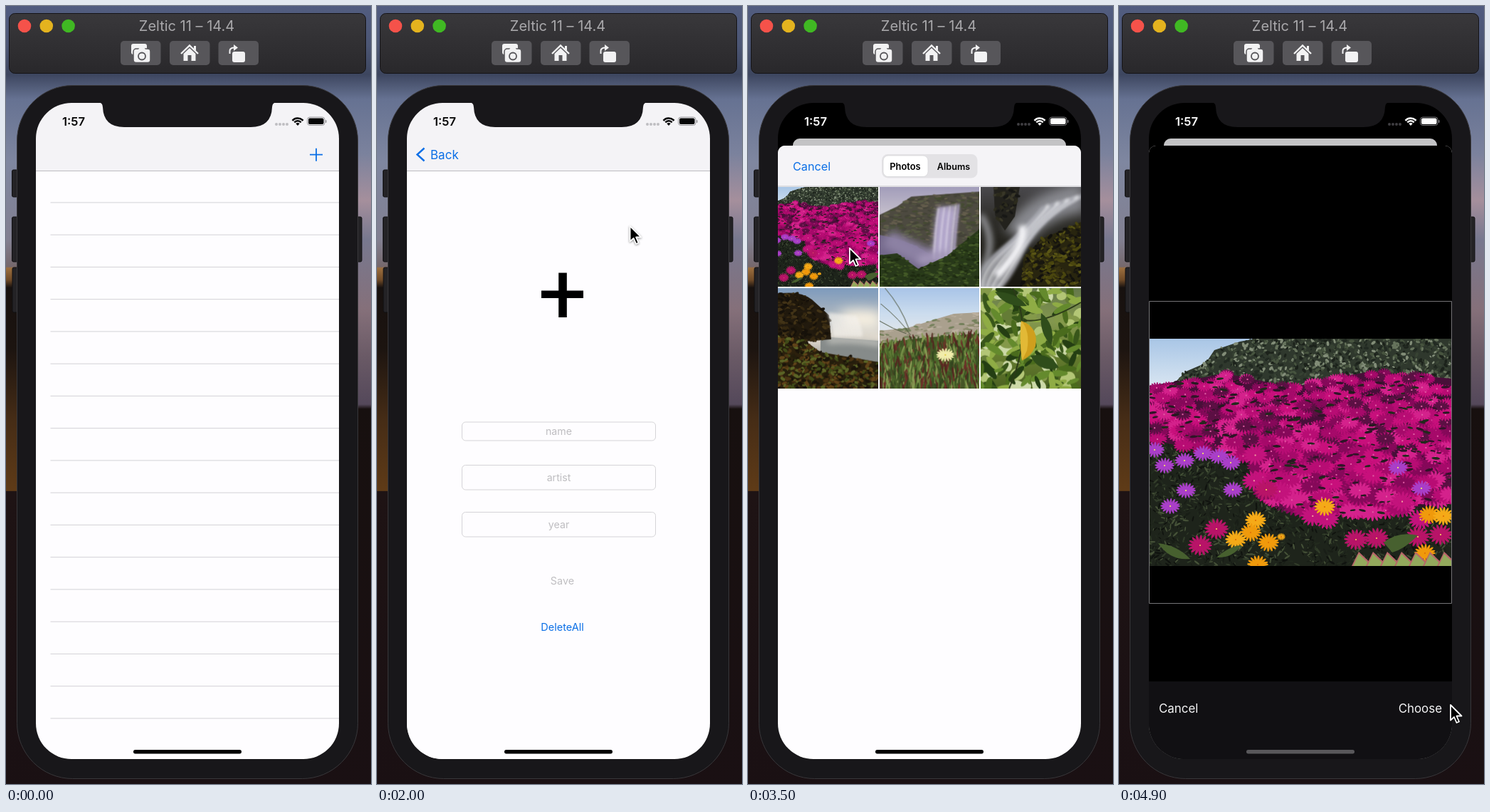
Animation, 513 px wide and 1092 px high, one loop 5000 ms. Source, as an HTML page with a canvas:

```html
<!DOCTYPE html>
<html lang="en">
<head>
<meta charset="utf-8">
<title>Phone simulator</title>
<style>
html, body { margin: 0; width: 100%; height: 100%; overflow: hidden; background: #17100f; }
canvas { display: block; width: 513px; height: 1092px; }
</style>
</head>
<body>
<canvas id="stage" width="513" height="1092"></canvas>
<script>
const LOOP = 5000;
const BLUE = '#0b6fe6';
const SCREEN = { x: 42, y: 136, w: 426, h: 921 };
const ctx = document.getElementById('stage').getContext('2d');

// Drawing helpers
function box(x, y, w, h, r, fill, stroke, lineWidth = 1) {
  ctx.beginPath();
  ctx.roundRect(x, y, w, h, r);
  if (fill) { ctx.fillStyle = fill; ctx.fill(); }
  if (stroke) { ctx.strokeStyle = stroke; ctx.lineWidth = lineWidth; ctx.stroke(); }
}
function disc(x, y, r, fill) {
  ctx.beginPath();
  ctx.arc(x, y, r, 0, 7);
  ctx.fillStyle = fill;
  ctx.fill();
}
function path(d, fill, stroke, lineWidth = 2) {
  const p = new Path2D(d);
  if (fill) { ctx.fillStyle = fill; ctx.fill(p); }
  if (stroke) { ctx.strokeStyle = stroke; ctx.lineWidth = lineWidth; ctx.stroke(p); }
}
// y is the middle of the capitals
function text(s, x, y, size, color, align = 'left', weight = 400) {
  ctx.font = `${weight} ${size}px Inter, sans-serif`;
  ctx.textAlign = align;
  ctx.fillStyle = color;
  ctx.fillText(s, x, y + size * 0.36);
}
function group(draw) {
  ctx.save();
  draw();
  ctx.restore();
}
function clip(x, y, w, h, r) {
  ctx.beginPath();
  ctx.roundRect(x, y, w, h, r);
  ctx.clip();
}
function gradient(g, y0, y1, stops) {
  const fill = g.createLinearGradient(0, y0, 0, y1);
  stops.forEach(([at, color]) => fill.addColorStop(at, color));
  return fill;
}

// Photos, painted once
let seed = 7;
function random() {
  seed = (seed * 16807) % 2147483647;
  return seed / 2147483647;
}
function pick(colors) {
  return colors[Math.floor(random() * colors.length)];
}
function photo(w, h, sky, paint) {
  const canvas = document.createElement('canvas');
  canvas.width = w;
  canvas.height = h;
  const g = canvas.getContext('2d');
  g.fillStyle = gradient(g, 0, h, sky.map((c, i) => [i / (sky.length - 1), c]));
  g.fillRect(0, 0, w, h);
  const shape = (color, d) => { g.fillStyle = color; g.fill(new Path2D(d)); };
  const scatter = (d, n, place) => {
    const area = new Path2D(d);
    for (let i = 0; i < n; i++) {
      const x = random() * w, y = random() * h;
      if (g.isPointInPath(area, x, y)) place(x, y);
    }
  };
  const specks = (d, n, rx, ry, colors, tilt = 0.3) => scatter(d, n, (x, y) => {
    const k = 0.5 + random() * 0.7;
    g.fillStyle = pick(colors);
    g.beginPath();
    g.ellipse(x, y, rx * k, ry * k, (random() - 0.5) * 2 * tilt, 0, 7);
    g.fill();
  });
  const veil = (color, width, d, blur = 3) => {
    g.save();
    g.filter = `blur(${blur}px)`;
    g.strokeStyle = color;
    g.lineWidth = width;
    g.stroke(new Path2D(d));
    g.restore();
  };
  const bloom = (x, y, r, color, heart, squash = 0.75) => {
    g.fillStyle = color;
    for (let a = 0; a < 6.2; a += 0.4) {
      g.beginPath();
      g.ellipse(x + Math.cos(a) * r * 0.5, y + Math.sin(a) * r * 0.5 * squash, r * 0.5, r * 0.12, a, 0, 7);
      g.fill();
    }
    g.fillStyle = heart;
    g.fillRect(x - 1, y - 1, 2, 2);
  };
  paint({ g, shape, scatter, specks, veil, bloom });
  return canvas;
}

const flowers = photo(426, 319, ['#a9c6e6', '#d6e4f1', '#20251d', '#1d211a', '#191b17', '#151713'],
  ({ shape, scatter, specks, bloom }) => {
    const hedge = 'M30 68 52 46 80 34 92 16 128 4 150 0H426V75H30Z';
    const bed = 'M0 66 80 54 105 48 200 68 310 46 426 56V225L340 245 235 245 165 225 150 170 0 142Z';
    const fringe = 'M0 130 160 130 180 230 250 270 426 270V200H0Z';
    const ground = 'M0 140 130 150 180 230 426 215V319H0Z';
    shape('#2f382d', hedge);
    specks(hedge, 6500, 3.2, 1.8, ['#47543f', '#66735c', '#222a22', '#374233', '#828d78', '#1c221b'], 1.5);
    shape('#1e241b', ground);
    specks(ground, 5000, 4, 1.1, ['#323d2a', '#10130f', '#465238', '#222a1e', '#191e17'], 1.5);
    shape('#480f39', bed);
    scatter(bed, 1500, (x, y) =>
      bloom(x, y, 8 + y / 24, pick(['#c8107c', '#a60a6a', '#b80d74', '#86095a', '#d4228c', '#5c1044']), '#e060a4', 0.45));
    specks(bed, 550, 5, 1.6, ['#251a20', '#301428', '#212a1c']);
    scatter(fringe, 45, (x, y) => { if (x > 140) bloom(x, y, 17, '#c3137c', '#efa0a0', 0.7); });
    [[8, 156], [22, 178], [50, 171], [76, 161], [98, 165], [115, 174], [52, 213], [30, 235], [118, 212], [350, 181], [383, 210]]
      .forEach(([x, y]) => bloom(x, y, 14, '#a93fc8', '#ead070', 0.6));
    [[72, 290], [95, 267], [291, 282], [378, 278], [410, 275], [320, 280], [165, 212]]
      .forEach(([x, y]) => bloom(x, y, 17, '#b81468', '#f0b060'));
    [[150, 255], [143, 272], [122, 282], [168, 286], [247, 236], [394, 247], [414, 249], [388, 301], [186, 278], [153, 317]]
      .forEach(([x, y], i) => bloom(x, y, i === 8 ? 6 : 15, i % 2 ? '#f09a0c' : '#f5aa18', '#e07808'));
    shape('#47602f', 'M13 287Q40 290 58 309Q30 312 13 287ZM95 307Q115 290 130 290Q118 308 95 307ZM330 286Q350 270 378 276Q360 295 342 300Z');
    for (let x = 285; x < 426; x += 20) {
      shape('#b9656a', `M${x} 319 ${x + 10} 299 ${x + 31} 319Z`);
      shape('#93a95c', `M${x + 2} 319 ${x + 10} 302 ${x + 28} 319Z`);
    }
  });

const valley = photo(141, 141, ['#a29dba', '#c2bccb', '#665d7b', '#827596', '#31421f'], ({ shape, specks, veil }) => {
  const hill = 'M0 40 25 28 45 14 100 10 141 7V100L90 108 50 82 0 70Z';
  const bank = 'M0 97 25 94 55 116 95 98 141 60V141H0Z';
  shape('#4d4a40', hill);
  specks(hill, 900, 4, 1.4, ['#575a42', '#444338', '#645d4c', '#454b32']);
  shape('#73688a', 'M0 68Q40 75 70 95L100 100 60 125 20 105 0 100Z');
  veil('#8d82a4', 26, 'M10 72Q40 90 80 104', 6);
  veil('#a79bc0', 26, 'M96 30Q90 60 88 100', 4);
  for (let x = 80; x < 110; x += 4) veil(x % 8 ? '#b5a9cf' : '#d8d0e6', 3, `M${x + 4} ${30 - (x - 80) / 5}Q${x - 1} 60 ${x - 3} 102`, 1.5);
  veil('#a397b8', 12, 'M55 104Q80 98 100 96', 5);
  shape('#28381a', bank);
  specks(bank, 1100, 3, 1.5, ['#36491f', '#1f2c12', '#435927', '#2a3d19']);
});

const stream = photo(141, 141, ['#4a494d', '#2f2e2a', '#1f1e18', '#191810'], ({ shape, specks, veil }) => {
  const moss = 'M60 100 85 74 141 50V141H58Z';
  const rock = 'M18 0H55L48 42 34 62 20 40Z';
  veil('#8a8b91', 40, 'M145 15Q80 25 50 70', 8);
  shape('#23221d', rock);
  specks(rock, 500, 4, 2, ['#171715', '#3a3829', '#2c2b1d'], 1);
  shape('#28250f', moss);
  specks(moss, 900, 4, 2, ['#4a460f', '#191710', '#373212', '#5a5616', '#12110e'], 1);
  for (let i = 0; i < 9; i++)
    veil(i % 2 ? '#e2e3e7' : '#a3a4ac', 5, `M${145 - i * 7} ${12 + i * 2}Q${85 - i * 3} ${40 + i * 3} ${60 - i * 4} 90T${22 - i * 3} 145`, 2);
  veil('#f4f4f7', 10, 'M58 55Q65 85 22 125', 3);
  veil('#a9aab0', 7, 'M0 40Q25 80 0 120', 4);
});

const falls = photo(141, 141, ['#7e9bbd', '#a9b4bf', '#e5ddd0', '#8f928f', '#33280f'], ({ shape, specks, veil }) => {
  const cliff = 'M0 8Q30 3 48 16L72 38 75 72 0 78Z';
  const shore = 'M0 66 38 74 60 90 141 104V141H0Z';
  veil('#fbf3e3', 25, 'M90 46Q115 40 145 46', 9);
  shape('#868b8a', 'M60 68 141 74V112H60Z');
  veil('#c2c2bd', 8, 'M70 74Q100 70 145 78', 4);
  shape('#221a0e', cliff);
  specks(cliff, 900, 4, 2, ['#352811', '#16110a', '#423317', '#1f180c'], 1);
  for (let x = 74; x < 112; x += 4) veil('#f4f1ec', 3.5, `M${x - 2} ${35 + (x - 74) / 8}Q${x + 5} 50 ${x + 7} 68`, 2);
  shape('#2b200d', shore);
  specks(shore, 1500, 3.5, 2, ['#4b3413', '#1a140a', '#604319', '#404a18', '#241e0d', '#5b6426'], 1);
});

const meadow = photo(141, 141, ['#a9c5e8', '#cbdcee', '#e7e9eb', '#70784f', '#3d4b22'], ({ g, shape, specks, bloom }) => {
  const dune = 'M0 60 40 56 75 45 105 36 141 34V85H0Z';
  const grass = 'M0 78 60 70 141 64V141H0Z';
  shape('#aaa08e', dune);
  specks(dune, 500, 4, 1.5, ['#bdb1a0', '#8d8b6d', '#75815c', '#b5aa9a']);
  shape('#455627', grass);
  specks(grass, 1700, 1.3, 8, ['#64803a', '#34461f', '#6e3029', '#4d692b', '#869a52', '#532820', '#3c5224'], 0.35);
  g.strokeStyle = '#4c553e';
  g.lineWidth = 1;
  g.stroke(new Path2D('M2 22Q30 45 44 66M8 0Q30 25 42 58M0 46Q20 58 38 64'));
  bloom(93, 94, 13, '#f1edac', '#e3cd45', 0.5);
});

const leaves = photo(141, 141, ['#65794a', '#84984f', '#677e30', '#4c6222'], ({ shape, specks, veil }) => {
  const all = 'M0 0H141V141H0Z';
  specks(all, 70, 12, 10, ['#b3c676', '#84994a', '#ccd9a8', '#647c36'], 1.5);
  specks(all, 130, 14, 4.5, ['#38561a', '#648a2d', '#243e13', '#8fac45', '#4a6b1d'], 1.5);
  veil('#2c3a19', 2, 'M45 0Q75 60 40 141M141 20Q90 50 60 45', 0.5);
  shape('#2f4d1b', 'M20 5Q50 5 65 25Q35 28 20 5ZM85 35Q105 50 100 80Q82 65 85 35ZM70 95Q98 90 110 112Q82 120 70 95Z');
  shape('#cf9f1d', 'M57 46Q82 55 77 82Q70 97 58 102Q54 70 57 46Z');
  shape('#e2b936', 'M57 46Q70 60 65 88L58 102Q54 70 57 46Z');
});

const photos = [flowers, valley, stream, falls, meadow, leaves];

// Motion
function spring(t, start) {
  const x = Math.max(0, t - start) * 0.0183;
  return 1 - (1 + x) * Math.exp(-x);
}
const pointerStops = [
  [100, 520, 400], [600, 442, 211], [1700, 442, 211], [2300, 268, 404], [3050, 268, 404],
  [3480, 142, 339], [3800, 134, 336], [4300, 134, 336], [4880, 465, 980], [5000, 465, 980]
];
function pointerAt(t) {
  const next = pointerStops.findIndex(stop => stop[0] > t);
  if (next < 1) return [520, 400];
  const [t0, x0, y0] = pointerStops[next - 1], [t1, x1, y1] = pointerStops[next];
  const u = (t - t0) / (t1 - t0), k = u * u * (3 - 2 * u);
  return [x0 + (x1 - x0) * k, y0 + (y1 - y0) * k];
}

// Scene parts
function wallpaper() {
  const top = [[0, '#525d80'], [0.05, '#4c5674'], [0.088, '#3d465f'], [0.12, '#667292']];
  ctx.fillStyle = gradient(ctx, 0, 1092, [...top, [0.2, '#7f87a0'], [0.3, '#828091'], [0.335, '#75686c'],
    [0.337, '#9c6f3e'], [0.352, '#704b28'], [0.362, '#17110f'], [0.44, '#1c1410'], [0.53, '#452c16'],
    [0.623, '#5f3b17'], [0.624, '#1e1314'], [1, '#1a1013']]);
  ctx.fillRect(0, 0, 257, 1092);
  ctx.fillStyle = gradient(ctx, 0, 1092, [...top, [0.19, '#7b829d'], [0.25, '#a58f9c'], [0.3, '#77788f'],
    [0.39, '#85707a'], [0.45, '#6a5a66'], [0.512, '#54485a'], [0.518, '#17100f'], [1, '#1a1013']]);
  ctx.fillRect(257, 0, 256, 1092);
}

function simulatorBar() {
  box(4.5, 10.5, 501, 84, 8, gradient(ctx, 10, 94, [[0, '#39383b'], [1, '#29282b']]), '#141316');
  ['#f5524a', '#e4b31f', '#40b823'].forEach((color, i) => disc(26 + i * 30.8, 28, 9.3, color));
  text('Zeltic 11 – 14.4', 254, 28, 20, '#a9a8ab', 'center');
  const key = '#57565a', ink = '#f2f2f3';
  [161, 230, 298.5].forEach(x => box(x, 49, 56.5, 34, 5, key));
  box(176, 53, 22, 15, 3, ink);
  box(179, 60, 24, 19.5, 4, ink, key, 1.5);
  path('M186 61 188 58H194L196 61Z', ink);
  ctx.beginPath();
  ctx.arc(191, 70.5, 5, 0, 7);
  ctx.strokeStyle = key;
  ctx.lineWidth = 1.8;
  ctx.stroke();
  path('M246 67 258 55.500 270 67', null, ink, 2.4);
  path('M249.500 67 258 59 266.500 67V77H249.500ZM264 56H267V63L264 60Z', ink);
  box(255.5, 69, 5, 8, 0, key);
  box(318, 64, 18, 15, 3, ink);
  path('M314.500 67V63Q314.500 58.500 321 58.500', null, ink, 2);
  path('M320 54 326 58.500 320 63Z', ink);
}

function bezel() {
  [[8.5, 230, 38], [8.5, 296, 63], [9, 367, 63], [492, 296, 63]].forEach(([x, y, h]) =>
    box(x, y, 8, h, 2, '#242326', '#111013'));
  box(15.5, 111.5, 479, 973, 78, '#18171a', '#38373a');
}

function list() {
  box(42, 231, 426, 826, 0, '#fefdff');
  ctx.fillStyle = '#d3d2d6';
  for (let i = 0; i < 17; i++) ctx.fillRect(62.5, 275.4 + i * 45.25, 406, 1);
}

function form() {
  box(42, 231, 426, 826, 0, '#fefdff');
  box(231, 399.5, 59, 10.5, 0, '#000');
  box(255.2, 374.5, 11.6, 62.5, 0, '#000');
  [['name', 584, 26], ['artist', 644.5, 34.5], ['year', 710.5, 34.5]].forEach(([label, y, h]) => {
    box(119.5, y, 272, h, 5, '#fefdff', '#d5d4d7');
    text(label, 255.5, y + h / 2, 14.2, '#bebdc0', 'center');
  });
  text('Save', 260.5, 807, 14.4, '#bfbec1', 'center');
  text('DeleteAll', 260.5, 872, 14.5, BLUE, 'center');
}

function navBar(push) {
  box(42, 136, 426, 95, 0, '#f4f3f6');
  box(42, 136, 426, 95, 0, `rgba(255,255,255,${2.6 * push * (1 - push)})`);
  box(42, 231, 426, 1, 0, '#bdbcc0');
  ctx.globalAlpha = Math.max(0, 1 - push * 1.38);
  path('M427 208.700H445M436 199.700V217.700', null, BLUE, 1.8);
  ctx.globalAlpha = push;
  path('M66.500 199.500 56.500 208.500 66.500 217.500', null, BLUE, 2.4);
  text('Back', 75 + 57 * (1 - push), 208.5, 17, BLUE);
  ctx.globalAlpha = 1;
}

function rootCard(push, present) {
  group(() => {
    ctx.translate(255, 136 + 50 * present);
    ctx.scale(1 - 0.098 * present, 1 - 0.098 * present);
    ctx.translate(-255, -136);
    clip(42, 136, 426, 921, 40 - 29 * present);
    group(() => {
      ctx.translate(-128 * push, 0);
      list();
    });
    if (push > 0) {
      box(42, 231, 426, 826, 0, `rgba(0,0,0,${0.11 * push})`);
      group(() => {
        ctx.translate(426 * (1 - push), 0);
        box(32, 231, 10, 826, 0, 'rgba(0,0,0,0.012)');
        form();
      });
    }
    navBar(push);
    box(42, 136, 426, 921, 0, `rgba(0,0,0,${0.2 * present ** 1.35})`);
  });
}

function photoGrid() {
  photos.forEach((image, i) => {
    const side = image.height;
    ctx.drawImage(image, (image.width - side) / 2, 0, side, side,
      42 + (i % 3) * 142.6, 253.5 + Math.floor(i / 3) * 142.6, 140.6, 140.4);
  });
}

function cropPage() {
  box(42, 196, 426, 861, 0, '#000');
  ctx.drawImage(flowers, 42, 467);
  box(42.5, 414.5, 425, 424, 0, null, '#747376');
  box(42, 948, 426, 109, 0, '#111013');
  text('Cancel', 56, 985.5, 16.9, '#f3f3f4');
  text('Choose', 454, 985.5, 16.9, '#f3f3f4', 'right');
}

function sheet(present, crop) {
  const drop = 861 * (1 - present);
  group(() => {
    if (present < 0.99) box(42, 196 + drop - 100 * (1 - present), 426, 870, 34, 'rgba(0,0,0,0.025)');
    clip(42, 196 + drop, 426, 870, [10, 10, 0, 0]);
    ctx.translate(0, drop);
    group(() => {
      ctx.translate(-128 * crop, 0);
      box(42, 196, 560, 870, 0, '#fefdff');
      ctx.globalAlpha = 1 - crop;
      box(42, 196, 426, 57, 0, '#f5f4f7');
      box(42, 252.5, 426, 1, 0, '#c4c3c7');
      text('Cancel', 63, 225, 16.2, BLUE);
      box(188, 208, 134.5, 33.5, 8.5, '#e3e2e5');
      box(190, 210, 63, 29.5, 7, '#fff', '#d5d4d7', 0.7);
      text('Photos', 221, 225, 12.9, '#000', 'center', 600);
      text('Albums', 289, 225, 12.6, '#000', 'center', 600);
      ctx.globalAlpha = 1;
      photoGrid();
    });
    if (crop > 0) {
      box(42, 253, 426, 804, 0, `rgba(0,0,0,${0.11 * crop})`);
      ctx.translate(426 * (1 - crop), 0);
      cropPage();
    }
  });
}

function statusBar(light) {
  const ink = light ? '#fff' : '#050506';
  text('1:57', 79, 162, 16.6, ink, 'left', 600);
  for (let i = 0; i < 4; i++) disc(380 + i * 5, 166, 2, light ? '#3f3e42' : '#bfbec2');
  for (let i = 0; i < 2; i++) {
    ctx.beginPath();
    ctx.arc(410, 167.5, 10 - i * 3.8, -Math.PI * 0.77, -Math.PI * 0.23);
    ctx.strokeStyle = ink;
    ctx.lineWidth = 2.4;
    ctx.stroke();
  }
  path('M410 168 407.300 165Q410 162.800 412.700 165Z', ink);
  box(423.5, 156, 24.5, 11.5, 3.5, null, light ? '#77767a' : '#99989c');
  box(425, 157.5, 21.5, 8.5, 2, ink);
  box(449, 160, 1.5, 4, 1, light ? '#77767a' : '#99989c');
}

function pointer(x, y) {
  group(() => {
    ctx.translate(x, y);
    ctx.lineJoin = 'round';
    ctx.shadowColor = 'rgba(0,0,0,0.35)';
    ctx.shadowBlur = 3;
    ctx.shadowOffsetY = 1;
    path('M1 1V22.500L6 18 9.500 26 13 24.500 9.500 16.500H16.500Z', '#000', '#fff', 1.8);
  });
}

function draw(t) {
  const push = spring(t, 1280), present = spring(t, 2525), crop = spring(t, 3920);
  wallpaper();
  simulatorBar();
  bezel();
  group(() => {
    clip(SCREEN.x, SCREEN.y, SCREEN.w, SCREEN.h, 50);
    box(SCREEN.x, SCREEN.y, SCREEN.w, SCREEN.h, 0, '#000');
    rootCard(push, present);
    if (present > 0) sheet(present, crop);
    statusBar(present > 0.5);
    box(179, 1044, 152, 5.5, 2.7, crop > 0.5 ? '#59585b' : '#000');
  });
  path('M130 135Q136 136 136 142Q137 170 166 170H344Q373 170 374 142Q374 136 380 135Z', '#18171a');
  pointer(...pointerAt(t));
}

function tick(now) {
  draw(now % LOOP);
  requestAnimationFrame(tick);
}
draw(0);
requestAnimationFrame(tick);
</script>
</body>
</html>
```
